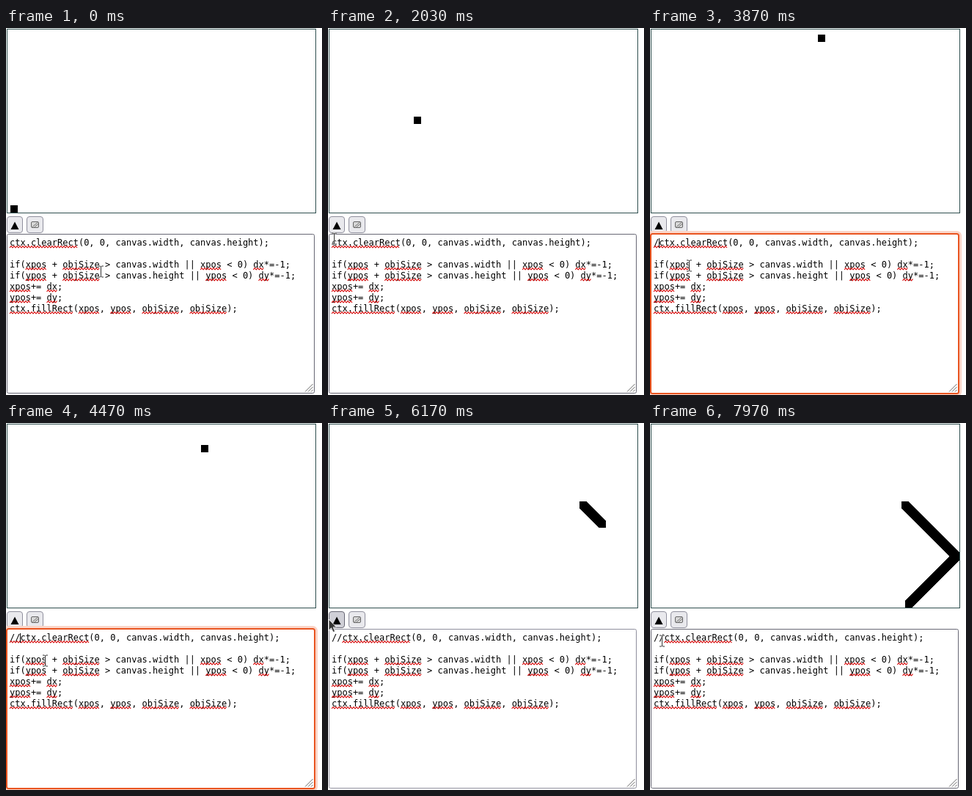
Animation of 431x501 px, one loop 8000 ms. Source, as an HTML page:

```html
<!DOCTYPE html>
<html lang="en">
<head>
<meta charset="utf-8">
<title>Bouncing square editor</title>
<style>
html, body { margin: 0; width: 100%; height: 100%; overflow: hidden; background: #fff; }
svg { display: block; }
text { font: 12px "DejaVu Sans Mono", monospace; fill: #000; }
.wave { fill: none; stroke: #d40000; stroke-width: 1.1; }
.button { fill: #e9e9ed; stroke: #8f8f9d; }
.button.hover { fill: #d0d0d7; stroke: #676774; }
.button.active { fill: #b1b1b9; stroke: #484851; }
.area { fill: #fff; stroke: #8f8f9d; }
.area.hover { stroke: #676774; }
</style>
</head>
<body>
<svg width="431" height="501" viewBox="0 0 431 501">
  <defs>
    <path id="bar" d="M-3.5 -7.5H-1L0 -6.5L1 -7.5H3.5M0 -6.5V6.5M-3.5 7.5H-1L0 6.5L1 7.5H3.5"/>
  </defs>

  <rect x="1.5" y="1.5" width="421" height="251" fill="#fff" stroke="#2f4f4f"/>
  <svg x="2" y="2" width="420" height="250" viewBox="2 2 420 250" overflow="hidden">
    <path id="trail" shape-rendering="crispEdges"/>
  </svg>

  <rect id="run" class="button" x="1.5" y="257.5" width="21" height="22" rx="3.5"/>
  <path d="M12 264.5L17.5 275H6.5Z"/>
  <rect class="button" x="28.5" y="257.5" width="22" height="22" rx="3.5"/>
  <rect x="34.5" y="264.5" width="10" height="8" rx="1.5" fill="#d8d8d8" stroke="#666"/>
  <path d="M35.5 272L43.5 265M38.5 272L44 267.5" stroke="#777" fill="none"/>

  <rect id="area" class="area" x="1.5" y="281.5" width="419" height="217" rx="2"/>
  <g id="focus" fill="none">
    <rect x="-1.5" y="278.5" width="425" height="223" rx="5" stroke="#fad5c8" stroke-width="3"/>
    <rect x="1" y="281" width="420" height="218" rx="2.5" fill="#fff" stroke="#e95420" stroke-width="2"/>
  </g>
  <path d="M408 496.5L418.500 486M412 496.5L418.500 490M416 496.5L418.500 494" stroke="#666" fill="none"/>
  <g id="code"></g>
  <path id="caret" d="M.5 287v13" stroke="#000"/>

  <g id="beam" fill="none">
    <use href="#bar" stroke="#fff" stroke-width="2.4" opacity=".6"/>
    <use href="#bar" stroke="#333"/>
  </g>
  <path id="arrow" d="M0 0V15L3.5 11.8L6 17.5L8.5 16.4L6 10.8H10.5Z" fill="#333" stroke="#fff" stroke-width=".8"/>
</svg>
<script>
const LOOP = 8000, SPEED = 0.0608;
const CHAR = 7.224, LEFT = 5, LINE = 15, BASELINE = 297;
const TRAIL_START = 347;
const FOCUS = 2250, SLASH1 = 3750, SLASH2 = 4050, PRESS = 5640, RELEASE = 5740;
const $ = id => document.getElementById(id);

const lines = [
  'ctx.clearRect(0, 0, canvas.width, canvas.height);',
  '',
  'if(xpos + objSize > canvas.width || xpos < 0) dx*=-1;',
  'if(ypos + objSize > canvas.height || ypos < 0) dy*=-1;',
  'xpos+= dx;',
  'ypos+= dy;',
  'ctx.fillRect(xpos, ypos, objSize, objSize);'
];

// The screen stands still during these spans
const stalls = [{ from: 870, to: 1130 }, { from: 6300, to: 6530 }];

const home = { x: 130, y: 332 };
const moves = [
  { from: 0, to: 870, x: 72, y: 308 },
  { from: 1130, to: 2030, x: 9, y: 287 },
  { from: 2400, to: 3500, x: 54, y: 324 },
  { from: 4530, to: 5000, x: 14, y: 293 },
  { from: 5150, to: 5500, x: 1, y: 268 },
  { from: 6530, to: 7000, x: 17, y: 297 }
];

function pointerAt(t) {
  let { x, y } = home;
  for (const m of moves) {
    const k = Math.min(1, Math.max(0, (t - m.from) / (m.to - m.from)));
    x += (m.x - x) * k;
    y += (m.y - y) * k;
  }
  return [Math.round(x), Math.round(y)];
}

// Distance run to the square's position, with bounces off three walls
function squareAt(s) {
  const x = 413 - Math.abs(417 - (1 + Math.abs(s - 5)) - 4);
  const y = 1 + Math.abs(s - 241);
  return [x, y];
}

function drawSquare(s) {
  const last = Math.max(0, s);
  let d = '';
  for (let i = Math.min(last, TRAIL_START); i <= last; i++) {
    const [x, y] = squareAt(i);
    d += `M${x} ${y}h10v10h-10z`;
  }
  $('trail').setAttribute('d', d);
}

function wave(x, width, y) {
  let d = `M${x} ${y + 3}`;
  for (let i = 2; i <= width; i += 2) d += `L${x + i} ${y + (i % 4 ? 0.7 : 3)}`;
  return `<path class="wave" d="${d}"/>`;
}

function codeLine(text, row, focused) {
  const y = BASELINE + row * LINE;
  const words = focused ? /\/*ctx\.\w+|[xy]pos|objSize|\bd[xy]\b/g
                        : /ctx\.\w+|[xy]pos|objSize|\bd[xy]\b/g;
  const waves = [...text.matchAll(words)]
    .map(m => wave(LEFT + m.index * CHAR, m[0].length * CHAR, y)).join('');
  const safe = text.replace(/</g, '&lt;').replace(/>/g, '&gt;');
  return `<text x="${LEFT}" y="${y}">${safe}</text>${waves}`;
}

let shown = '';
function drawCode(slashes, focused) {
  const key = slashes + '|' + focused;
  if (key === shown) return;
  shown = key;
  const typed = '/'.repeat(slashes);
  $('code').innerHTML = lines.map((line, row) =>
    codeLine(row ? line : typed + line, row, focused)).join('');
}

function show(el, on) { el.style.display = on ? '' : 'none'; }

function place(el, x, y) { el.setAttribute('transform', `translate(${x} ${y})`); }

function draw(now) {
  let t = now % LOOP;
  const stall = stalls.find(p => t >= p.from && t < p.to);
  if (stall) t = stall.from;

  drawSquare(Math.floor(SPEED * (t - 30)));

  const focused = t >= FOCUS && t < PRESS;
  const slashes = (t >= SLASH1) + (t >= SLASH2);
  drawCode(slashes, focused);
  show($('focus'), focused);
  const caretOn = t < SLASH2 || Math.floor((t - SLASH2) / 600) % 2 === 0;
  show($('caret'), focused && caretOn);
  place($('caret'), Math.round(LEFT + slashes * CHAR), 0);

  const [x, y] = pointerAt(t);
  const inArea = y >= 281;
  $('area').classList.toggle('hover', inArea);
  $('run').classList.toggle('hover', x < 23 && y < 280);
  $('run').classList.toggle('active', t >= PRESS && t < RELEASE);
  show($('beam'), inArea);
  show($('arrow'), !inArea);
  place($('beam'), x - 0.5, y + 0.5);
  place($('arrow'), x, y);
}

const start = performance.now();
function tick() {
  draw(performance.now() - start);
  requestAnimationFrame(tick);
}
tick();
</script>
</body>
</html>
```
